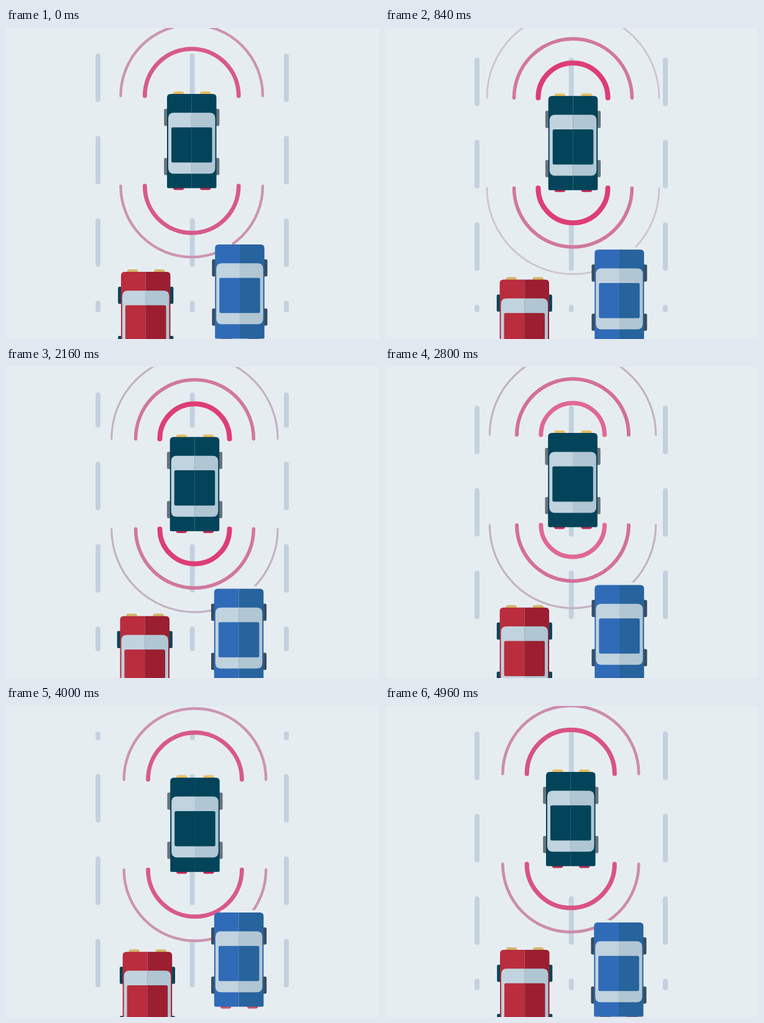
Animation of 600x500 px, one loop 5 s. Source, as an HTML page:

```html
<!DOCTYPE html>
<html lang="en">
<head>
<meta charset="utf-8">
<title>Cars in lanes</title>
<style>
  html, body { margin: 0; width: 100%; height: 100%; overflow: hidden; background: #e6edf1; }
  svg { display: block; width: 600px; height: 500px; }
  .lane { stroke: #c3d1df; stroke-width: 8; stroke-linecap: round; stroke-dasharray: 70 62.5; }
  .ring { fill: none; stroke-linecap: round; }
</style>
</head>
<body>
<svg id="stage" viewBox="0 0 600 500"></svg>
<script>
const NS = 'http://www.w3.org/2000/svg';
const stage = document.getElementById('stage');

const STEP = 40;          // ms per drawn step
const STEPS = 125;        // steps in one loop
const SPAN = STEPS - 1;   // the last step equals the first for road and cars
const DASH = 132.5;
const MID = 39.75;        // half the width of a car

function add(parent, tag, attrs = {}) {
  const el = document.createElementNS(NS, tag);
  for (const key in attrs) el.setAttribute(key, attrs[key]);
  return parent.appendChild(el);
}

// A rounded box made of two mirrored halves around the car's middle.
function box(parent, x, top, bottom, rTop, rBottom, [left, right]) {
  const half = s => {
    const edge = MID + s * (MID - x), i = -s;
    return `M${MID} ${top}H${edge + i * rTop}Q${edge} ${top} ${edge} ${top + rTop}` +
      `V${bottom - rBottom}Q${edge} ${bottom} ${edge + i * rBottom} ${bottom}H${MID}Z`;
  };
  add(parent, 'path', { d: half(-1), fill: left });
  add(parent, 'path', { d: half(1), fill: right });
}

function makeCar({ paint, wheel, front, rear }) {
  const g = add(stage, 'g');
  const rect = (x, y, width, height, rx, fill) => add(g, 'rect', { x, y, width, height, rx, fill });
  for (const x of [-4.8, 75.3]) {
    for (const y of [24, 103]) rect(x, y, 9, 27.5, 2, wheel);
  }
  for (const x of [9.8, 53]) {
    rect(x, -4, 17.5, 9, 3.5, front);
    rect(x, 146, 17.5, 8.5, 3.5, rear);
  }
  box(g, 0, 0, 151.5, 6, 2.5, paint);
  box(g, 2, 30.3, 128.3, 9, 9, ['#c1d3de', '#b0c6d3']);
  box(g, 7, 53.7, 110.3, 2.5, 2.5, paint);
  return g;
}

// Smooth closed curve through [step, x, y] points.
function follow(points, f) {
  const n = points.length;
  const at = i => {
    const turn = Math.floor(i / n), [t, x, y] = points[i - turn * n];
    return [t + turn * SPAN, x, y];
  };
  let i = n - 1;
  while (points[i][0] > f) i--;
  const [a, b, c, d] = [at(i - 1), at(i), at(i + 1), at(i + 2)];
  const h = c[0] - b[0], u = (f - b[0]) / h, v = 1 - u;
  return [1, 2].map(k => {
    const m0 = (c[k] - a[k]) / (c[0] - a[0]) * h;
    const m1 = (d[k] - b[k]) / (d[0] - b[0]) * h;
    return b[k] * (1 + 2 * u) * v * v + m0 * u * v * v +
      c[k] * u * u * (3 - 2 * u) - m1 * u * u * v;
  });
}

const lanes = [148, 299.7, 451].map(x =>
  add(stage, 'line', { class: 'lane', x1: x, x2: x, y1: 45, y2: 453 }));

const sonar = add(stage, 'g');
const rings = [1, 10, 18].map(start => ({ start, el: add(sonar, 'path', { class: 'ring' }) }));

const cars = [
  {
    el: makeCar({ paint: ['#03445a', '#03445a'], wheel: '#6a737b', front: '#e8bf62', rear: '#c42a53' }),
    path: [[0, 259, 106], [21, 262.7, 109.2], [35, 258.6, 111], [54, 263.7, 112.4], [86, 260.6, 101.7], [100, 264.2, 115.2]]
  },
  {
    el: makeCar({ paint: ['#b92d3e', '#9b1f31'], wheel: '#03445a', front: '#d2b769', rear: '#c42a53' }),
    path: [[0, 185, 392], [21, 184.5, 404.5], [35, 187.2, 381], [54, 183.5, 400.5], [86, 186.5, 373.2], [100, 187.7, 395.3]]
  },
  {
    el: makeCar({ paint: ['#306bb8', '#27639c'], wheel: '#374c5e', front: '#e6edf1', rear: '#cf5468' }),
    path: [[0, 336.2, 348], [21, 337.2, 356.2], [35, 334.3, 347.5], [54, 334.8, 356.5], [86, 339, 341.2], [100, 334.9, 332]]
  }
];

const mix = (a, b, k) => a.map((v, i) => Math.round(v + (b[i] - v) * k));
const clamp = v => Math.max(0, Math.min(1, v));

function drawRing({ start, el }, f) {
  const age = (f - start + 50) % 25;
  const r = 41.5 + 4.85 * age;
  const color = mix([222, 61, 117], [196, 178, 196], clamp((age - 3) / 16));
  const alpha = age > 21.9 ? 0 : Math.min((age + 1) / 4, (22 - age) / 3, 1);
  const arc = (y, sweep) => `M${MID - r} ${y}A${r} ${r} 0 0 ${sweep} ${MID + r} ${y}`;
  el.setAttribute('d', arc(3, 1) + arc(148, 0));
  el.setAttribute('stroke', `rgb(${color})`);
  el.setAttribute('stroke-width', age < 3 ? 5 + age : 8 - 0.3 * (age - 3));
  el.setAttribute('opacity', alpha);
}

function draw(f) {
  const shift = f * 18 * DASH / SPAN % DASH;
  for (const lane of lanes) lane.setAttribute('stroke-dashoffset', -shift);
  for (const { el, path } of cars) {
    el.setAttribute('transform', `translate(${follow(path, f % SPAN)})`);
  }
  sonar.setAttribute('transform', cars[0].el.getAttribute('transform'));
  for (const ring of rings) drawRing(ring, f);
}

const begin = performance.now();
function tick() {
  const time = performance.now() - begin;
  draw(Math.floor(time / STEP + 0.05) % STEPS);
  requestAnimationFrame(tick);
}
tick();
</script>
</body>
</html>
```
